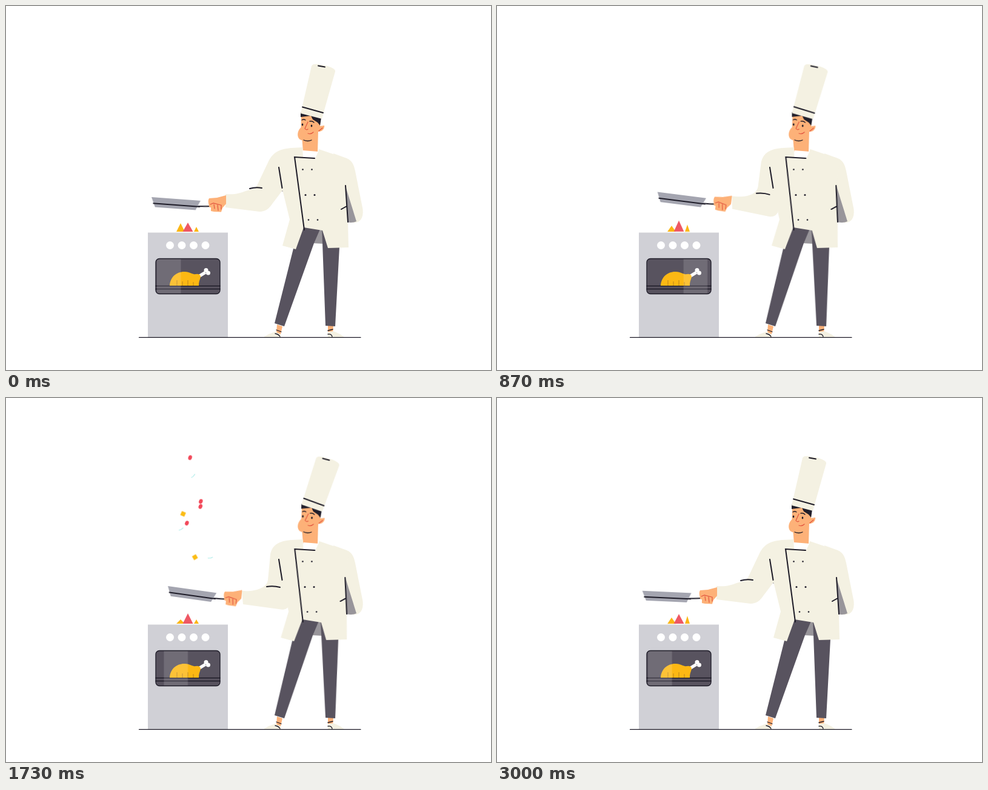
These frames come from a looping animation (800x600 px, 3030 ms). An HTML page without scripts:

```html
<!DOCTYPE html>
<html lang="en">
<head>
<meta charset="utf-8">
<title>Chef tossing vegetables</title>
<style>
html, body { margin: 0; width: 100%; height: 100%; overflow: hidden; background: #fff; }
svg { display: block; width: 800px; height: 600px; }

.cream { fill: #f4f1e2; }
.skin { fill: #fdb178; }
.gray { fill: #98959a; }
.trousers { fill: #58535f; }
.dark { fill: #211f2b; }
.line { fill: none; stroke: #1d1b27; stroke-width: 2; stroke-linecap: round; }
.thin { stroke-width: 1.3; }
.red-line { fill: none; stroke: #e2553f; stroke-width: 1.2; stroke-linecap: round; }

.sleeve, .crease, .pan, .hand, .body, .legs, .head, .hat, .flame {
  animation: 3030ms ease-in-out infinite;
}
.sleeve { animation-name: sleeve; }
.crease { animation-name: crease; }
.pan { animation-name: pan; }
.hand { animation-name: hand; }
.body { animation-name: body; transform-origin: 0 265px; }
.legs { animation-name: legs; transform-origin: 0 525px; }
.head { animation-name: head; transform-origin: 503px 215px; }
.hat { animation-name: hat; transform-origin: 504px 181px; }

@keyframes sleeve {
  0%, 18.8%, 97%, 100% { d: path("M470 234C450 236 441 241 433 256L414 296C410 302 403 303 395 305C385 309 378 311 362 310L362 332L418 339C428 339 434 334 440 325L456 304L470 290Z"); }
  25.7%, 57.1% { d: path("M470 234C450 236 439 242 436 258L432 300C431 308 424 313 414 316C402 319 398 318 389 318L391 340L450 348C459 350 464 348 467 342L467 330L470 300Z"); animation-timing-function: ease-in; }
  37.3%, 66% { d: path("M470 234C450 236 442 243 433 255L417 282C412 290 406 289 398 286C390 282 383 279 374 274L362 287L403 330C410 335 418 335 426 329L454 302L470 290Z"); animation-timing-function: ease-out; }
  41.6%, 70.3% { d: path("M470 234C450 236 438 241 431 251L414 277C409 285 404 284 398 280C390 275 382 266 374 262L361 275L395 322C402 329 410 331 418 325L451 293L470 285Z"); }
  50.8%, 81.5% { d: path("M470 234C450 236 440 242 435 256L423 294C420 302 414 304 406 305C394 307 385 306 374 303L371 324L423 342C433 345 440 343 444 333L456 305L470 295Z"); }
}
@keyframes crease {
  0%, 18.8%, 97%, 100% { d: path("M402 301Q412 298 422 300"); }
  25.7%, 57.1% { d: path("M430 311Q441 309 452 312"); animation-timing-function: ease-in; }
  37.3%, 66% { d: path("M411 290Q421 293 428 301"); animation-timing-function: ease-out; }
  41.6%, 70.3% { d: path("M408 284Q418 288 424 297"); }
  50.8%, 81.5% { d: path("M414 304Q426 302 436 307"); }
}
@keyframes pan {
  0%, 100% { transform: translate(333.2px, 329.9px) rotate(4.2deg); }
  13.2% { transform: translate(330px, 328.5px) rotate(-2deg); animation-timing-function: ease-in; }
  18.8% { transform: translate(333.2px, 327.7px) rotate(-1.4deg); }
  25.7%, 57.1% { transform: translate(359px, 331px) rotate(8deg); animation-timing-function: ease-in; }
  37.3%, 66% { transform: translate(338.5px, 284px) rotate(.7deg); animation-timing-function: ease-out; }
  41.6%, 70.3% { transform: translate(339.5px, 261.3px) rotate(28.8deg); }
  50.8%, 81.5% { transform: translate(343.6px, 303.7px) rotate(47.5deg); }
  97%, 99% { transform: translate(333.2px, 329.9px) rotate(2.6deg); }
}
@keyframes hand {
  0%, 18.8%, 97%, 100% { transform: translate(362px, 317px); }
  13.2% { transform: translate(359px, 317px); animation-timing-function: ease-in; }
  25.7%, 57.1% { transform: translate(388px, 321.5px) rotate(5deg); animation-timing-function: ease-in; }
  37.3%, 66% { transform: translate(369px, 283px) rotate(22deg); animation-timing-function: ease-out; }
  41.6%, 70.3% { transform: translate(369.7px, 265.5px) rotate(30deg); }
  50.8%, 81.5% { transform: translate(373.5px, 308px) rotate(30deg); }
}
@keyframes body {
  0%, 18.8%, 97%, 100% { transform: skewX(0deg); }
  25.7%, 57.1% { transform: skewX(-1.2deg); animation-timing-function: ease-in; }
  37.3%, 66% { transform: skewX(-2.3deg); animation-timing-function: ease-out; }
  41.6%, 70.3% { transform: skewX(-3.7deg); }
  50.8%, 81.5% { transform: skewX(-1.9deg); }
}
@keyframes legs {
  0%, 18.8%, 97%, 100% { transform: skewX(0deg); }
  25.7%, 57.1% { transform: skewX(.8deg); animation-timing-function: ease-in; }
  37.3%, 66% { transform: skewX(1.5deg); animation-timing-function: ease-out; }
  41.6%, 70.3% { transform: skewX(2.5deg); }
  50.8%, 81.5% { transform: skewX(1.2deg); }
}
@keyframes head {
  0%, 18.8%, 98%, 100% { transform: rotate(0deg); }
  37.3% { transform: rotate(1.4deg); animation-timing-function: linear; }
  57.1% { transform: rotate(1.8deg); }
  70.3% { transform: rotate(2.6deg); animation-timing-function: linear; }
  49%, 81.5% { transform: rotate(4deg); }
}
@keyframes hat {
  0%, 18.8%, 98%, 100% { transform: rotate(0deg); }
  37.3% { transform: rotate(1.4deg); animation-timing-function: linear; }
  57.1% { transform: rotate(2.7deg); }
  70.3% { transform: rotate(3.2deg); animation-timing-function: linear; }
  49%, 81.5% { transform: rotate(5.2deg); }
}

.flame { transform-origin: 0 372px; animation-timing-function: linear; }
.left { fill: #fbb615; animation-name: flame-left; }
.mid { fill: #ee5864; animation-name: flame-mid; }
.right { fill: #fbb615; animation-name: flame-right; }
@keyframes flame-left {
  0%, 81.5% { transform: scaleY(1.4); }
  7%, 31%, 76% { transform: scaleY(.8); }
  13%, 25%, 45%, 88% { transform: scaleY(1.3); }
  18.8%, 57.1% { transform: scaleY(.7); }
  37.3% { transform: scaleY(.6); }
  51%, 64% { transform: scaleY(1.1); }
  70.3% { transform: scaleY(.4); }
  94% { transform: scaleY(.7); }
  99% { transform: scaleY(1); }
  100% { transform: scaleY(1.4); }
}
@keyframes flame-mid {
  0%, 100% { transform: scaleY(.75); }
  6%, 25%, 64%, 93% { transform: scaleY(1.2); }
  12%, 31%, 51% { transform: scaleY(.75); }
  18.8%, 57.1% { transform: scaleY(.85); }
  37.3% { transform: scaleY(1); }
  44%, 81.5% { transform: scaleY(1.3); }
  70.3% { transform: scaleY(.55); }
  87%, 99% { transform: scaleY(.8); }
}
@keyframes flame-right {
  0%, 100% { transform: scaleY(.8); }
  6%, 26%, 46%, 70.3%, 99% { transform: scaleY(1.3); }
  12%, 51% { transform: scaleY(1); }
  18.8%, 37.3%, 57.1%, 90% { transform: scaleY(.7); }
  81.5% { transform: scaleY(1); }
}

.glint { fill: #fff; opacity: .15; animation: glint 757.5ms cubic-bezier(.37, 0, .63, 1) infinite alternate; }
@keyframes glint { to { transform: translateX(62px); } }

/* --t launch, --a and --b start and end x, --p peak y */
.bit {
  opacity: 0;
  animation: drift 3030ms linear var(--t) infinite, toss 3030ms var(--t) infinite, show 3030ms step-end var(--t) infinite;
}
@keyframes drift {
  0% { translate: var(--a) 0; }
  28%, 100% { translate: var(--b) 0; }
}
@keyframes toss {
  0% { transform: translateY(280px) rotate(0deg); animation-timing-function: cubic-bezier(.333, .667, .667, 1); }
  14% { transform: translateY(var(--p)) rotate(90deg); animation-timing-function: cubic-bezier(.333, 0, .667, .333); }
  28%, 100% { transform: translateY(310px) rotate(190deg); }
}
@keyframes show {
  0%, 27%, 100% { opacity: 0; }
  1.8% { opacity: 1; }
}
</style>
</head>
<body>
<svg viewBox="0 0 800 600">
  <defs>
    <rect id="corn" x="-3.6" y="-3.6" width="7.2" height="7.2" fill="#fbbc14"/>
    <ellipse id="pea" rx="4" ry="3.1" fill="#f2495a"/>
    <path id="leaf" d="M-4 -1Q0 -1 4 2" fill="none" stroke="#9fe9e6"/>
    <clipPath id="pane"><rect x="247" y="416.500" width="106" height="58" rx="6"/></clipPath>
  </defs>

  <!-- stove -->
  <path class="flame left" d="M281 372L288 362L295 372Z"/>
  <path class="flame right" d="M310 372L314 362L318 372Z"/>
  <path class="flame mid" d="M291.500 372L300 352L308.500 372Z"/>
  <rect x="234" y="373.500" width="132" height="172.500" fill="#d0d0d6"/>
  <g fill="#fff">
    <circle cx="270.500" cy="394.500" r="6.500"/><circle cx="290" cy="394.500" r="6.500"/>
    <circle cx="309.500" cy="394.500" r="6.500"/><circle cx="329" cy="394.500" r="6.500"/>
  </g>
  <rect x="247" y="416.500" width="106" height="58" rx="6" fill="#58535f"/>
  <path class="line thin" d="M247 461.500H353M247 466.500H353"/>
  <path d="M316 447L329 439" stroke="#fff" stroke-width="5"/>
  <g fill="#fff"><circle cx="330" cy="435.500" r="3.500"/><circle cx="333.500" cy="440" r="3.500"/></g>
  <path d="M270 461C271 446 282 437.500 295 438C304 438.500 308 443 313 442Q320 441 321 446C320 452 318 453 318 461Z" fill="#fcb814"/>
  <path d="M282 452V461M291 454V461M300 452V461M309 455V461" fill="none" stroke="#b9831c"/>
  <g clip-path="url(#pane)"><rect class="glint" x="249" y="416" width="39.500" height="59"/></g>
  <rect x="247" y="416.500" width="106" height="58" rx="6" class="line thin"/>

  <!-- first toss -->
  <use class="bit" href="#corn" style="--t:980ms;--a:317px;--b:311px;--p:193px"/>
  <use class="bit" href="#leaf" style="--t:980ms;--a:316px;--b:340px;--p:196px"/>
  <use class="bit" href="#leaf" style="--t:1040ms;--a:259px;--b:296px;--p:155px"/>
  <use class="bit" href="#leaf" style="--t:1100ms;--a:295px;--b:314px;--p:72px"/>
  <use class="bit" href="#corn" style="--t:1100ms;--a:278px;--b:297px;--p:154px"/>
  <use class="bit" href="#pea" style="--t:1118ms;--a:290px;--b:309px;--p:46px"/>
  <use class="bit" href="#pea" style="--t:1100ms;--a:305px;--b:327px;--p:127px"/>
  <use class="bit" href="#pea" style="--t:1100ms;--a:300px;--b:328px;--p:138px"/>
  <use class="bit" href="#pea" style="--t:1100ms;--a:285px;--b:303px;--p:174px"/>

  <!-- second toss -->
  <use class="bit" href="#leaf" style="--t:1903ms;--a:261px;--b:291px;--p:115px"/>
  <use class="bit" href="#corn" style="--t:1905ms;--a:317px;--b:342px;--p:135px"/>
  <use class="bit" href="#leaf" style="--t:1928ms;--a:332px;--b:290px;--p:112px"/>
  <use class="bit" href="#corn" style="--t:1980ms;--a:288px;--b:305px;--p:92px"/>
  <use class="bit" href="#corn" style="--t:2080ms;--a:288px;--b:292px;--p:96px"/>
  <use class="bit" href="#pea" style="--t:2100ms;--a:308px;--b:330px;--p:155px"/>
  <use class="bit" href="#pea" style="--t:2120ms;--a:298px;--b:306px;--p:152px"/>
  <use class="bit" href="#pea" style="--t:2150ms;--a:292px;--b:300px;--p:111px"/>
  <use class="bit" href="#leaf" style="--t:2160ms;--a:335px;--b:335px;--p:56px"/>

  <!-- feet and ground -->
  <path class="skin" d="M447 525L456 528L453 541L446 539ZM531 526H540L539 540H531Z"/>
  <path class="cream" d="M426 545Q434 540 444 537L453 541L453 546H426ZM531 537L540 536Q551 540 558 546H531Z"/>
  <path class="line thin" d="M446 534L454 537M444 540Q450 541 452 545M531 535L539 533M531 541Q537 540 538 545"/>
  <path class="line thin" d="M219.500 546.300H585"/>

  <!-- legs -->
  <g class="legs">
    <path class="gray" d="M512 368H525V392L506 391Z"/>
    <path class="trousers" d="M488 362L518 368L508 391L459 528L443 523L474 400ZM521 366L532 392L550 397L543 528L527 527L522 391Z"/>
  </g>

  <!-- torso -->
  <path class="cream" d="M540 243L562 251C573 256 574 264 576 272L588.500 335C590 350 584 357 574 357L558 355L555 290Z"/>
  <path class="gray" d="M557 297H560L578 355Q570 359 557 355Z"/>
  <path class="gray" d="M452 286L457 306L446 303Z"/>
  <path class="skin" d="M488 215L490 240L514 241L515 205Z"/>
  <g class="body">
    <path class="cream" d="M489 233L470 234L450 245L448 260L456 303L468 352L456 395L478 401L491 365L522 370L531 399L565 398L564 357L560 295L566 253L516 236L510 250H490Z"/>
    <path d="M490 238L515 240L510 251L490 249Z" fill="#fff"/>
    <path class="line" d="M509 251L476 249L492 369M560 296L564 356M553 335L562 330"/>
    <g class="dark">
      <circle cx="489.500" cy="269.500" r="1.300"/><circle cx="504.500" cy="269.500" r="1.300"/>
      <circle cx="494" cy="311.500" r="1.500"/><circle cx="509" cy="311.500" r="1.500"/>
      <circle cx="499" cy="352.500" r="1.300"/><circle cx="514" cy="352.500" r="1.300"/>
    </g>
  </g>

  <!-- head -->
  <g class="head">
    <path class="skin" d="M487 178L486.500 200C479 207 480 218 486 220.500C495 224 508 222 513 212L515 207C521 208 526 202 525 197L518 198L519 184Z"/>
    <path class="dark" d="M486 175L520 184L518 197L514 192L506 187L503 181L494 182L486 183Z"/>
    <path class="line thin" d="M488 188Q491 186 494 188M501 190Q505 189 508 192M491 221Q498 224 504 221"/>
    <ellipse class="dark" cx="489" cy="195.500" rx="1.300" ry="2"/>
    <ellipse class="dark" cx="504" cy="197.500" rx="1.300" ry="2"/>
    <path class="red-line" d="M498 191L493 202Q495 205 498 203M498 210Q503 212 507 208M516 206L522 201"/>
    <g class="hat">
      <path class="cream" d="M504 99C506 94 513 96 522 97.500C533 99 544 103 543 108L521 186L486 177Z"/>
      <path class="line" d="M489 166.500L523 176M515 98.500L526 100.500"/>
    </g>
  </g>

  <!-- arm and pan -->
  <g class="pan">
    <path d="M-94 -8H-13L-20 8H-87Z" fill="#a4a5b0"/>
    <path class="line" d="M-90 2L-14 2"/>
    <path class="line" d="M-16 1.500L4 0" stroke-width="3"/>
  </g>
  <path class="sleeve cream" d="M470 234C450 236 441 241 433 256L414 296C410 302 403 303 395 305C385 309 378 311 362 310L362 332L418 339C428 339 434 334 440 325L456 304L470 290Z"/>
  <path class="crease line" d="M402 301Q412 298 422 300"/>
  <path class="line" d="M450 266L455.500 300"/>
  <g class="hand">
    <path class="skin" d="M1 -5L-14 -1L-27 0Q-29 3 -28 8L-27 14L-24 15L-24 21L-19 22L-7 22.500L-5 16L1 9Z"/>
    <path class="red-line" d="M-25 10L-20 8L-8 11M-19 10L-18 17M-13 11L-12 20M-7 11L-7 18"/>
  </g>
</svg>
</body>
</html>
```
